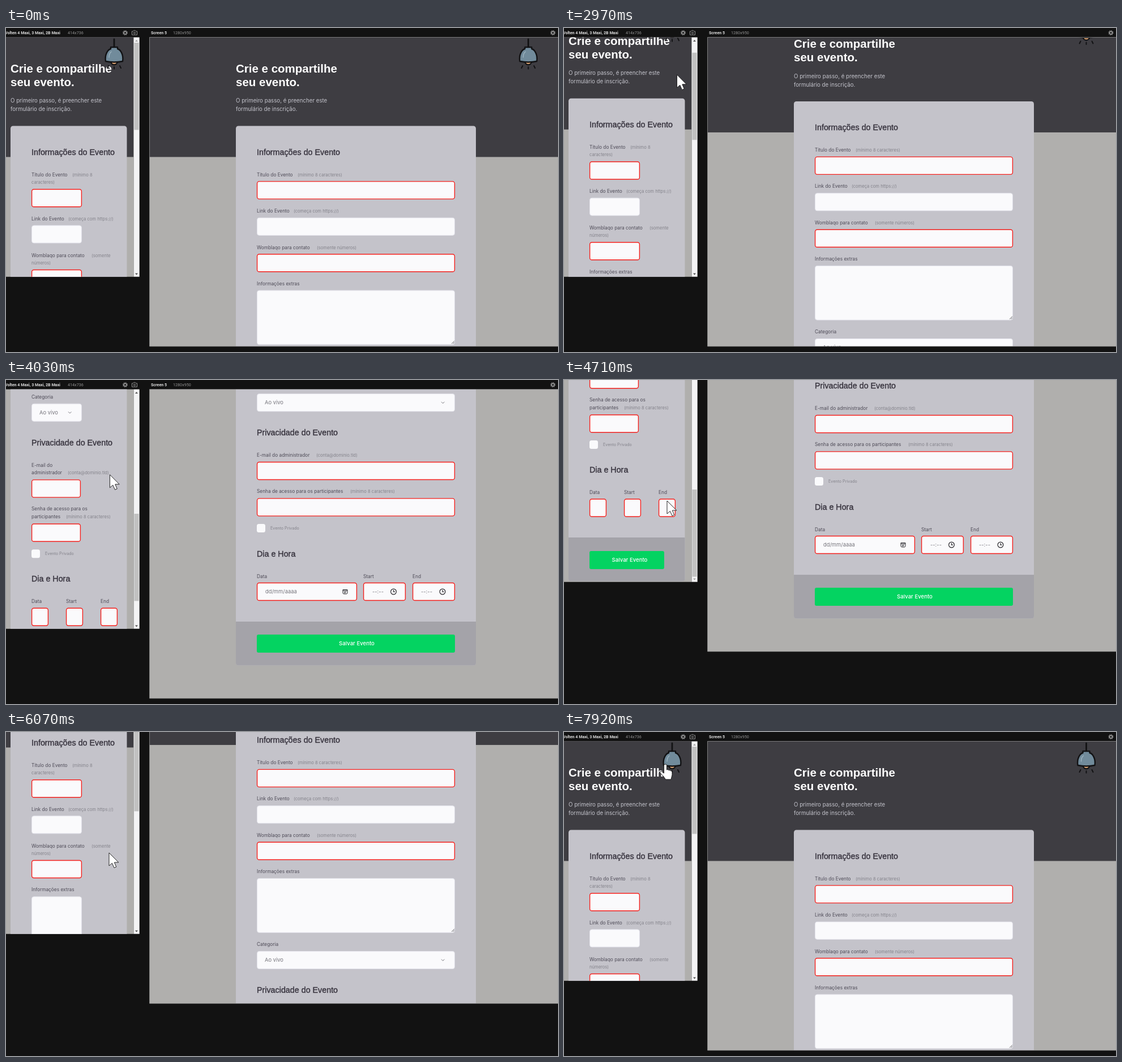
Write an HTML page that moves like this. It is 975 by 574 pixels and loops after 7.99 s.

```html
<!DOCTYPE html>
<html lang="pt">
<head>
<meta charset="utf-8">
<title>Formulário responsivo</title>
<style>
  html, body { margin: 0; width: 100%; height: 100%; overflow: hidden; background: #121212; }
  svg { display: block; width: 975px; height: 574px; }
  text { font-family: Inter, "Open Sans", sans-serif; font-feature-settings: "calt" 0; }
  .title { font: bold 20.5px "Liberation Sans", Arial, sans-serif; fill: #fff; }
  .intro { font-size: 9.7px; fill: #c4c4cc; }
  .legend { font: 14.3px "Liberation Sans", Arial, sans-serif; fill: #38343f; stroke: #38343f; stroke-width: .4px; }
  .label { font-size: 8.3px; fill: #4e4b57; }
  .hint { font-size: 7.6px; fill: #84838b; }
  .check { font-size: 7.15px; fill: #84838b; }
  .value { font-size: 9.4px; fill: #77767d; }
  .button { font-size: 9.6px; font-weight: 500; fill: #fff; text-anchor: middle; }
  .device { font: bold 7.1px Roboto, sans-serif; fill: #ddd; }
  .size { font: 7.2px Roboto, sans-serif; fill: #929292; }
  .line { fill: none; stroke: #77767d; }
  .icon { fill: none; stroke: #29282d; }
</style>
</head>
<body>
<svg viewBox="0 0 975 574">
  <defs>
    <clipPath id="phoneClip"><rect y="16.5" width="225.5" height="424.2"/></clipPath>
    <clipPath id="laptopClip"><rect x="253.5" y="16.5" width="722" height="547.5"/></clipPath>
    <g id="lamp" stroke="#121214" stroke-width="2.4" stroke-linecap="round" stroke-linejoin="round">
      <path d="M0 20V33" stroke-width="2.8"/>
      <path d="M-10 67l-2 4M0 69v3.5M10 67l2 4" stroke-width="2"/>
      <ellipse cy="60" rx="5.5" ry="5" fill="#f3b57f"/>
      <path d="M-15 59C-17 47-11 38-6 37V34H6V37C11 38 17 47 15 59Q0 62-15 59Z" fill="#718b9b"/>
      <path d="M-9 52Q-9 45-5 42" stroke="#9db3bf" stroke-width="1.4" fill="none"/>
    </g>
    <g id="gear" fill="none" stroke="#909090">
      <circle r="2.4" stroke-width="1.7"/>
      <circle r="3.8" stroke-width="1.4" stroke-dasharray="1.6 1.38"/>
    </g>
  </defs>
  <rect width="975" height="574" fill="#121212"/>
  <g id="shell">
    <text class="device" x="-2" y="10.5">Volten 4 Maxi, 3 Maxi, 2B Maxi</text>
    <text class="size" x="109" y="10.5">414x736</text>
    <text class="device" x="256" y="10.5">Screen 5</text>
    <text class="size" x="295" y="10.5">1280x950</text>
    <use href="#gear" x="210.5" y="8.5"/>
    <use href="#gear" x="966" y="8.5"/>
    <path d="M222.5 5.8h2.2l1-1.4h2.6l1 1.4h2.2v6.4h-9Z" fill="none" stroke="#909090"/>
    <circle cx="227" cy="8.8" r="1.6" fill="none" stroke="#909090"/>
    <g clip-path="url(#phoneClip)"><g id="phone"></g></g>
    <rect x="225.5" y="16.5" width="10.2" height="424.2" fill="#f3f3f4"/>
    <rect id="thumb" x="226.5" y="26" width="8" height="154.5" fill="#c1c1c1"/>
    <path id="arrowUp" d="M228 24h5l-2.5-3Z"/>
    <path id="arrowDown" d="M228 434.5h5l-2.5 3Z"/>
    <g clip-path="url(#laptopClip)"><g id="laptop"></g></g>
    <path d="M975 16.5H253.5V564H975" fill="none" stroke="#88888a" stroke-width=".8"/>
  </g>
  <path id="arrow" d="M0 0V23L5.4 18.4L9 26.6L12.8 25L9.4 17H16.8Z" fill="#fff" stroke="#111" stroke-width=".9"/>
  <path id="hand" d="M-2.5 2.5a2.5 2.5 0 0 1 5 0V10q2.4-1.2 3.6.8q2.2-1 3.3 1q2.4-.6 2.6 2V19L10 27H.5L-3 22L-9 15.5q-1.2-3 1.8-3L-2.5 16Z" fill="#fff" stroke="#111" stroke-width=".9"/>
</svg>
<script>
const LOOP = 7990, PHONE_MAX = 690, LAPTOP_MAX = 569.5, LAPTOP_LAG = 10;
const $ = id => document.getElementById(id);

const text = (kind, x, y, s) => `<text class="${kind}" x="${x}" y="${y}">${s}</text>`;
const rect = (x, y, w, h, fill, extra = '') =>
  `<rect x="${x}" y="${y}" width="${w}" height="${h}" fill="${fill}" ${extra}/>`;
const field = (x, y, w, invalid, h = 32.2) =>
  rect(x + .6, y + .6, w - 1.2, h - 1.2, '#fafafc',
    `rx="3.6" stroke="${invalid ? '#f5201d' : '#e4e4ec'}" stroke-width="${invalid ? 1.4 : 1}"`);
const label = (x, y, s, hintX, hint) =>
  text('label', x, y, s) + (hint ? text('hint', hintX, y, hint) : '');
const area = (x, y, w) => field(x, y, w, false, 97) +
  `<path class="icon" stroke-width=".7" d="M${x + w - 6} ${y + 95}l5-5m-2.5 5l2.5-2.5"/>`;
const select = (x, y, w) => field(x, y, w) + text('value', x + 14, y + 19.4, 'Ao vivo') +
  `<path class="line" d="M${x + w - 24} ${y + 14.7}l2.7 2.7l2.7-2.7"/>`;
const checkbox = (x, y, gap) => rect(x, y, 15, 15, '#fafafc', 'rx="3.5"') +
  text('check', x + gap, y + 9.7, 'Evento Privado');
const clock = (x, y) => `<g class="icon" stroke-width="1.2"><circle cx="${x}" cy="${y}" r="4.9"/>
  <path d="M${x} ${y - 3}v3.2h2.6"/></g>`;

// Header, card and first legend, identical in both layouts apart from x
function page(view, bottom, left, cardW, lampX) {
  return rect(view, 0, 722, 1300, '#b0afad') + rect(view, 0, 722, 228.5, '#3e3d42') +
    text('title', left, 79, 'Crie e compartilhe') + text('title', left, 103, 'seu evento.') +
    text('intro', left, 132.2, 'O primeiro passo, é preencher este') +
    text('intro', left, 147.2, 'formulário de inscrição.') +
    `<use href="#lamp" x="${lampX}"/>` +
    rect(left, 173.5, cardW, bottom - 173.5, '#c4c3ca', 'rx="4.5"') +
    `<path d="M${left} ${bottom - 77.5}h${cardW}v73q0 4.5-4.5 4.5h${9 - cardW}q-4.5 0-4.5-4.5Z" fill="#a4a3a9"/>` +
    text('legend', left + 37, 225, 'Informações do Evento');
}
const submit = (x, y, w, mid) => rect(x, y, w, 32, '#04d361', 'rx="3"') +
  text('button', mid, y + 19.3, 'Salvar Evento');

function laptopPage() {
  const x = 443, w = 350;
  return page(253, 1075, 406, 424, 922.5) +
    label(x, 263, 'Título do Evento', 515, '(mínimo 8 caracteres)') + field(x, 271.3, w, true) +
    label(x, 327, 'Link do Evento', 508, '(começa com https://)') + field(x, 335.7, w) +
    label(x, 391.7, 'Womblaqo para contato', 549, '(somente números)') + field(x, 400.2, w, true) +
    label(x, 456, 'Informações extras') + area(x, 464.4, w) +
    label(x, 584.5, 'Categoria') + select(x, 593.5, w) +
    text('legend', x, 667.5, 'Privacidade do Evento') +
    label(x, 705.3, 'E-mail do administrador', 548, '(conta@dominio.tld)') + field(x, 714.4, w, true) +
    label(x, 769.8, 'Senha de acesso para os participantes', 608, '(mínimo 8 caracteres)') + field(x, 778.8, w, true) +
    checkbox(x, 824.5, 24) +
    text('legend', x, 882, 'Dia e Hora') +
    label(x, 920, 'Data') + label(631, 920, 'Start') + label(718, 920, 'End') +
    field(x, 928.4, 177, true) + field(631, 928.4, 75, true) + field(718, 928.4, 75, true) +
    text('value', 458, 947.3, 'dd/mm/aaaa') + text('value', 647, 947, '--:--') + text('value', 733, 947, '--:--') +
    `<path class="icon" d="M595 941h8v5.5q0 2-2 2h-4q-2 0-2-2ZM595 942.6h8M597 944.8h4M597 946.6h3"/>` +
    clock(684.5, 944.5) + clock(771, 944.5) + submit(x, 1020.5, w, 619.5);
}

function phonePage() {
  const x = 45, w = 89;
  const times = ['Data', 'Start', 'End'].map((name, i) =>
    label(x + 61 * i, 975, name) + field(x + 61 * i, 983.4, 30, true)).join('');
  return page(0, 1129.5, 8, 205.5, 191) +
    label(x, 263, 'Título do Evento', 117, '(mínimo 8') + text('hint', x, 276, 'caracteres)') + field(x, 285.2, w, true) +
    label(x, 340.7, 'Link do Evento', 110, '(começa com https://)') + field(x, 349.3, w) +
    label(x, 405.7, 'Womblaqo para contato', 151, '(somente') + text('hint', x, 419, 'números)') + field(x, 427.9, w, true) +
    label(x, 483.3, 'Informações extras') + area(x, 492.3, w) +
    label(x, 613, 'Categoria') + select(x, 621.4, w) +
    text('legend', x, 696, 'Privacidade do Evento') +
    label(x, 734, 'E-mail do') + label(x, 747.3, 'administrador', 109, '(conta@dominio.tld)') + field(x, 756.1, 87, true) +
    label(x, 811.2, 'Senha de acesso para os') + label(x, 825.2, 'participantes', 106, '(mínimo 8 caracteres)') + field(x, 834.2, 87, true) +
    checkbox(x, 880, 24) +
    text('legend', x, 937, 'Dia e Hora') + times + submit(x, 1076, 132, 116);
}

$('laptop').innerHTML = laptopPage();
$('phone').innerHTML = phonePage();

// Keyframes: [time, ...values]
const scrollKeys = [[2830, 0], [2900, 12], [3470, 307], [3690, 400], [4240, PHONE_MAX], [5160, PHONE_MAX],
  [5230, 675], [5560, 453], [5660, 439], [5760, 370], [6000, 150], [6200, 60], [6480, 0]];
const shellKeys = [[4240, 0], [4500, 57], [4570, 74], [4640, 81], [4710, 83],
  [6960, 83], [7030, 75], [7240, 25], [7440, 0]];
const cursorKeys = [[270, 868, 555], [410, 420, 240], [550, 160, 116], [620, 148, 120], [750, 148, 120],
  [950, 164, 105], [1410, 164, 105], [1480, 164, 109], [1560, 164, 107], [1700, 164, 107],
  [2000, 190, 85], [2200, 223, 60], [2370, 211, 50], [2500, 211, 50], [2640, 209, 42], [2830, 209, 42],
  [3200, 184, 149], [3800, 184, 149], [4600, 182, 214], [6960, 182, 214],
  [7440, 177, 165], [7640, 177, 165], [7920, 179, 57]];

function sample(keys, t) {
  const next = keys.findIndex(k => k[0] > t);
  if (next === 0) return keys[0].slice(1);
  if (next < 0) return keys[keys.length - 1].slice(1);
  const a = keys[next - 1], b = keys[next];
  const p = (t - a[0]) / (b[0] - a[0]);
  return a.slice(1).map((v, i) => v + (b[i + 1] - v) * p);
}

const move = (id, x, y) => $(id).setAttribute('transform', `translate(${x} ${y})`);
const show = (id, on) => $(id).setAttribute('visibility', on ? 'visible' : 'hidden');

function render(t) {
  const [scroll] = sample(scrollKeys, t);
  const [follow] = sample(scrollKeys, t - LAPTOP_LAG);
  const [shell] = sample(shellKeys, t);
  const [x, y] = sample(cursorKeys, t);
  move('shell', 0, -shell);
  move('phone', 0, -scroll);
  move('laptop', 0, -Math.min(follow, LAPTOP_MAX));
  move('thumb', 0, scroll * .3638);
  $('arrowUp').setAttribute('fill', scroll > 0 ? '#505050' : '#a3a3a3');
  $('arrowDown').setAttribute('fill', scroll < PHONE_MAX ? '#505050' : '#a3a3a3');
  const overLamp = x > 174 && x < 207 && y < 73;
  move('arrow', x, y);
  move('hand', x, y);
  show('arrow', t >= 270 && !overLamp);
  show('hand', t >= 270 && overLamp);
}

const start = performance.now();
function tick() {
  render((performance.now() - start) % LOOP);
  requestAnimationFrame(tick);
}
tick();
</script>
</body>
</html>
```
